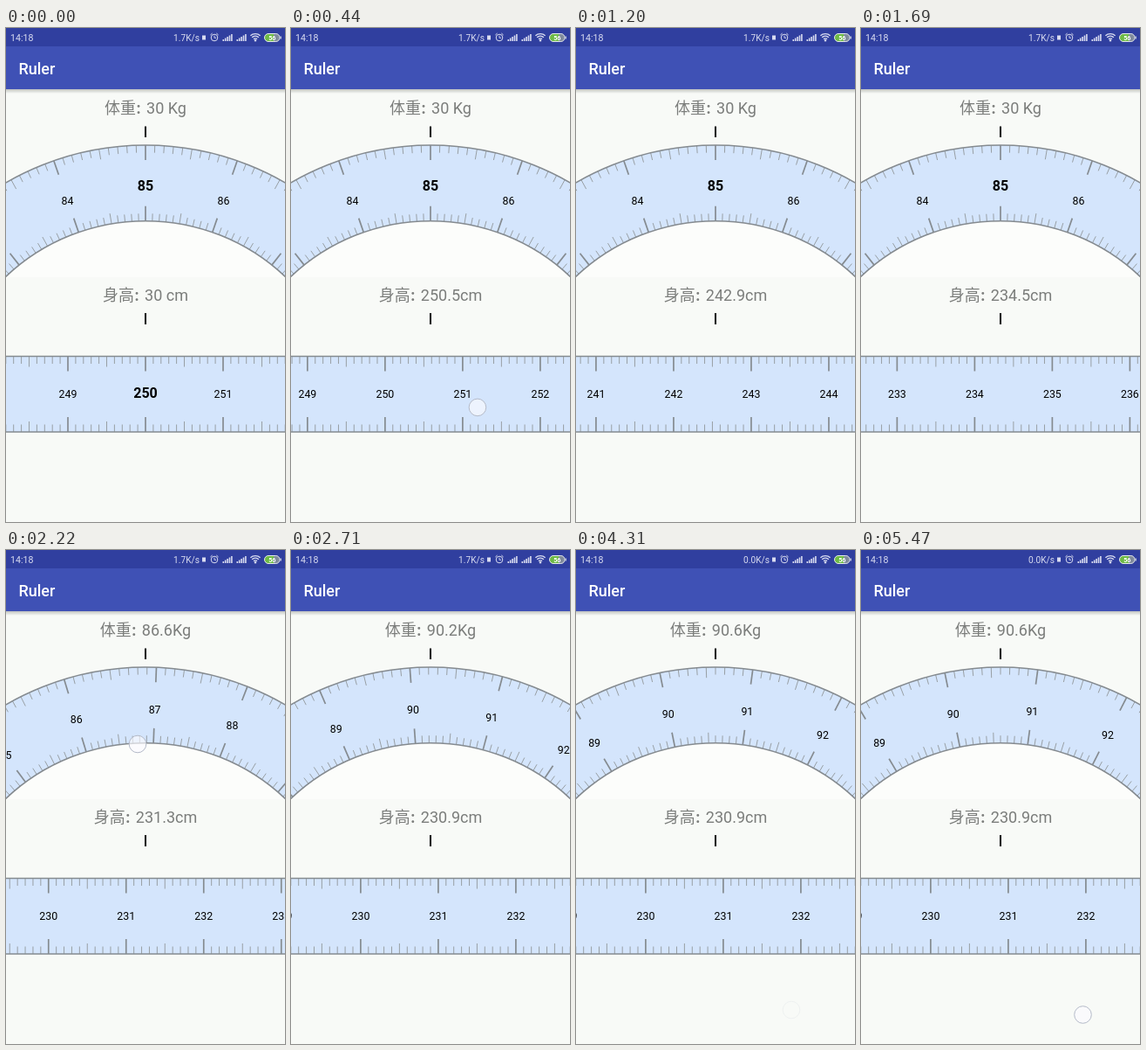
These frames come from a looping animation (320 by 565 pixels, 5520 ms). An HTML page with a canvas:

```html
<!DOCTYPE html>
<html lang="zh">
<head>
<meta charset="utf-8">
<title>Ruler</title>
<style>
html, body { margin: 0; width: 100%; height: 100%; overflow: hidden; background: #f8faf7; }
canvas { display: block; width: 320px; height: 565px; }
</style>
</head>
<body>
<canvas id="stage"></canvas>
<script>
const W = 320, H = 565, LOOP = 5520, MID = 160;
const UNIT = 89, TOP = 375.5, BOTTOM = 462;   // straight ruler: pixels per unit, edges
const CY = 454, OUT = 320, IN = 233.3, STEP = 0.335; // dial: centre, radii, radians per unit
const LINE = '#858b90', TICK = '#989fa4', FILL = '#d4e5fc', BG = '#f8faf7';
const LAG = 16;                               // the readout trails the ruler

const canvas = document.getElementById('stage');
const scale = window.devicePixelRatio || 1;
canvas.width = W * scale;
canvas.height = H * scale;
const c = canvas.getContext('2d');

const clamp = x => Math.max(0, Math.min(1, x));
const mix = (a, b, u) => a + (b - a) * u;
const rest = (t, start, end, power) => clamp((end - t) / (end - start)) ** power;

// Each ruler is dragged, then flung to its resting value.
const heightDrag = t => clamp((t - 180) / 570) ** 1.5;
const weightDrag = t => clamp((t - 2060) / 160) ** 1.3;

function heightAt(t) {
  if (t < 886) return 250 + 1.89 * heightDrag(t);
  return 230.9 + 20.99 * rest(t, 886, 2710, 3.11);
}

function weightAt(t) {
  if (t < 2220) return 85 + 1.87 * weightDrag(t);
  return 90.6 - 3.73 * rest(t, 2220, 3400, 4.25);
}

function text(s, x, y, size, color, align = 'center', weight = 400) {
  c.font = `${weight} ${size}px Roboto, "Noto Sans CJK SC", "Noto Sans CJK", sans-serif`;
  c.textAlign = align;
  c.fillStyle = color;
  c.fillText(s, x, y + size * 0.36);
}

function line(x1, y1, x2, y2, width, color) {
  c.lineWidth = width;
  c.strokeStyle = color;
  c.beginPath();
  c.moveTo(x1, y1);
  c.lineTo(x2, y2);
  c.stroke();
}

function box(x, y, w, h, color) {
  c.fillStyle = color;
  c.fillRect(x, y, w, h);
}

function arc(x, y, r, from, to, width, color) {
  c.lineWidth = width;
  c.strokeStyle = color;
  c.beginPath();
  c.arc(x, y, r, from, to);
  c.stroke();
}

function disc(x, y, r, color) {
  c.fillStyle = color;
  c.beginPath();
  c.arc(x, y, r, 0, 7);
  c.fill();
}

function readout(label, value, y) {
  const size = 18, gap = 12, color = '#7b7d7b';
  c.font = `${size}px Roboto, sans-serif`;
  const x = MID - (2 * size + gap + c.measureText(value).width) / 2;
  text(label, x, y, size, color, 'left');
  text(':', x + 2 * size + 3, y, size, color, 'center', 700);
  text(value, x + 2 * size + gap, y, size, color, 'left');
}

// Calls draw(offset, length, width, colour, label) for each visible mark.
function marks(value, draw) {
  for (let i = Math.ceil((value - 2.6) * 10); i <= (value + 2.6) * 10; i++) {
    const major = i % 10 === 0;
    const length = major ? 17 : i % 5 === 0 ? 12 : 8.5;
    draw(i / 10 - value, length, major ? 1.7 : 1, major ? LINE : TICK, major ? i / 10 : null);
  }
}

function number(n, offset, x, y) {
  if (Math.abs(offset) < 1e-6) text(n, x, y - 1.4, 16, '#000', 'center', 700);
  else text(n, x, y, 12.4, '#000');
}

function dial(value) {
  c.save();
  c.beginPath();
  c.rect(0, 130, W, 155);
  c.clip();
  disc(MID, CY, OUT, FILL);
  disc(MID, CY, IN, '#fcfdfb');
  marks(value, (offset, length, width, color, label) => {
    const s = Math.sin(offset * STEP), k = Math.cos(offset * STEP);
    const ray = (a, b) => line(MID + a * s, CY - a * k, MID + b * s, CY - b * k, width, color);
    ray(OUT, OUT - length);
    ray(IN, IN + length);
    if (label !== null) number(label, offset, MID + 272 * s, CY - 272 * k);
  });
  arc(MID, CY, OUT, 0, 7, 1.6, LINE);
  arc(MID, CY, IN, 0, 7, 1.6, LINE);
  c.restore();
}

function straight(value) {
  box(0, TOP, W, BOTTOM - TOP, FILL);
  marks(value, (offset, length, width, color, label) => {
    const x = MID + offset * UNIT;
    line(x, TOP, x, TOP + length, width, color);
    line(x, BOTTOM, x, BOTTOM - length, width, color);
    if (label !== null) number(label, offset, x, 419);
  });
  line(0, TOP, W, TOP, 1.6, LINE);
  line(0, BOTTOM, W, BOTTOM, 1.6, LINE);
}

function signal(x) {
  for (let i = 0; i < 5; i++) box(x + i * 2.4, 13 - i * 1.5, 1.6, 2 + i * 1.5, '#d9dcf0');
}

function battery() {
  c.save();
  c.beginPath();
  c.roundRect(296.5, 6.5, 17.5, 9, 4.5);
  c.clip();
  box(296, 6, 19, 10, '#7f8a9c');
  box(296, 6, 11, 10, '#6dba46');
  c.restore();
  c.lineWidth = 1;
  c.strokeStyle = '#e4e8ec';
  c.stroke();
  box(314.5, 9.5, 1.2, 3, '#e4e8ec');
  text('56', 305.3, 11, 7.2, '#fff', 'center', 700);
}

function bars(t) {
  const pale = '#d9dcf0';
  box(0, 0, W, 21, '#303f9f');
  box(0, 21, W, 49, '#3f51b5');
  const shade = c.createLinearGradient(0, 70, 0, 75);
  shade.addColorStop(0, 'rgba(0,0,0,.22)');
  shade.addColorStop(1, 'rgba(0,0,0,0)');
  box(0, 70, W, 5, shade);
  text('Ruler', 14.5, 47, 18, '#fff', 'left', 500);

  text('14:18', 5, 11, 10.6, pale, 'left');
  text(t < 3700 ? '1.7K/s' : '0.0K/s', 222, 11, 10.2, pale, 'right');
  box(225, 8.5, 4, 5, pale);
  arc(239, 11, 3.8, 0, 7, 1, pale);
  line(239, 8.8, 239, 11.3, 0.9, pale);
  line(239, 11.3, 241, 11.3, 0.9, pale);
  line(234.4, 8, 236.6, 6, 1, pale);
  line(241.4, 6, 243.6, 8, 1, pale);
  signal(248.5);
  signal(264.5);
  for (const r of [3, 5.8, 8.4]) arc(286, 15, r, -2.3, -0.84, 1.4, pale);
  disc(286, 14.3, 1.2, pale);
  battery();
}

function finger(x, y, alpha = 1) {
  c.globalAlpha = alpha;
  disc(x, y, 10, 'rgba(250,251,255,.65)');
  arc(x, y, 9.8, 0, 7, 1, '#b4bac8');
  c.globalAlpha = 1;
}

function touches(t) {
  if (t >= 180 && t < 930) {
    const u = heightDrag(t);
    const back = (250 + 1.89 * u - heightAt(t)) * UNIT;
    finger(mix(266, 98, u) + back, mix(428, 447, u) - back * 0.12);
  }
  if (t >= 2060 && t < 2250) {
    const u = weightDrag(t);
    finger(mix(290, 151, u), mix(205, 222, u));
  }
  if (t >= 3900 && t < 5470) finger(247, 526, t < 4090 ? 1 : 0.15);
  if (t >= 5470) finger(254.5, 531.5);
}

function draw(t) {
  c.setTransform(scale, 0, 0, scale, 0, 0);
  box(0, 0, W, H, BG);
  bars(t);
  const kg = weightAt(t - LAG), cm = heightAt(t - LAG);
  readout('体重', kg === 85 ? '30 Kg' : kg.toFixed(1) + 'Kg', 92);
  line(MID, 112.5, MID, 125, 2, '#000');
  dial(weightAt(t));
  readout('身高', cm === 250 ? '30 cm' : cm.toFixed(1) + 'cm', 306);
  line(MID, 326, MID, 339, 2, '#000');
  straight(heightAt(t));
  touches(t);
}

const start = performance.now();
function frame() {
  draw((performance.now() - start) % LOOP);
  requestAnimationFrame(frame);
}
frame();
</script>
</body>
</html>
```
